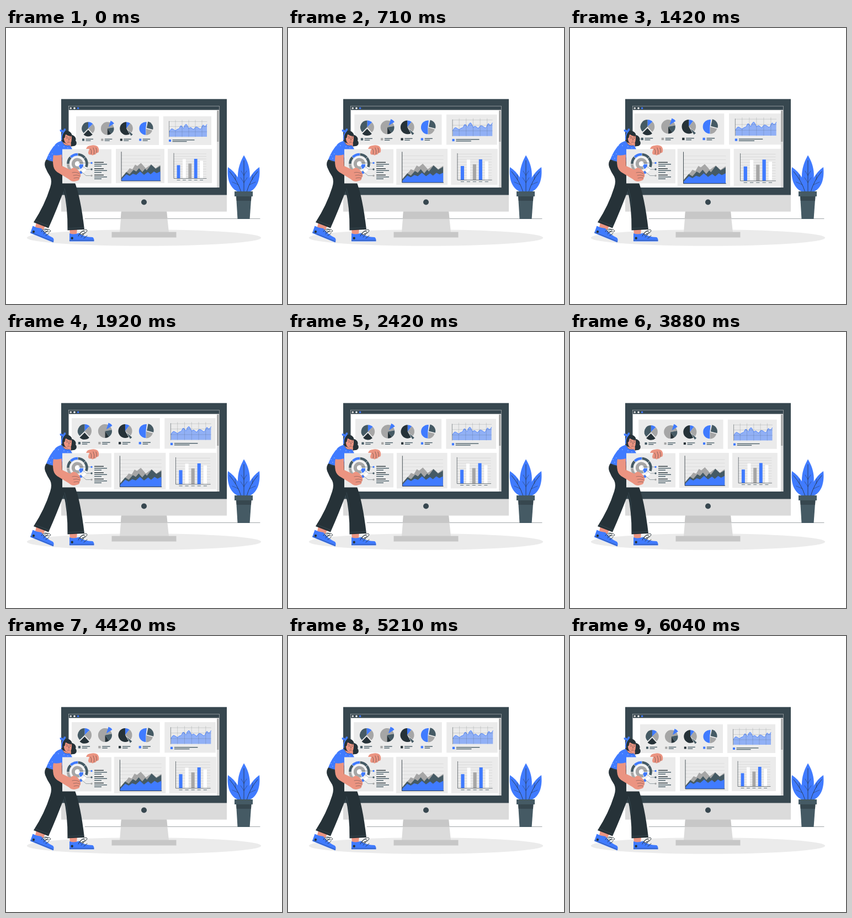
Animation of 500 by 500 pixels, one loop 6080 ms. Source, as an HTML page:

```html
<!DOCTYPE html>
<html lang="en">
<head>
<meta charset="utf-8">
<title>Dashboard</title>
<style>
html, body { margin: 0; width: 100%; height: 100%; overflow: hidden; background: #fff; }
svg { display: block; width: 100vw; height: 100vh; }
</style>
</head>
<body>
<svg id="stage" viewBox="0 0 500 500"></svg>
<script>
const BLUE = '#407bff', INK = '#263238', SLATE = '#455a64', FRAME = '#37474f',
      GRAY = '#a6a6a6', PANEL = '#ebebeb', SKIN = '#eb9481', WHITE = '#fff';

const path = (d, fill, extra = '') => `<path d="${d}" fill="${fill}" ${extra}/>`;
const stroke = (d, color, width = 0.6, extra = '') =>
  path(d, 'none', `stroke="${color}" stroke-width="${width}" stroke-linecap="round" stroke-linejoin="round" ${extra}`);
const rect = (x, y, w, h, fill, extra = '') =>
  `<rect x="${x}" y="${y}" width="${w}" height="${h}" fill="${fill}" ${extra}/>`;
const circle = (x, y, r, fill) => `<circle cx="${x}" cy="${y}" r="${r}" fill="${fill}"/>`;
const range = (n, make) => Array.from({ length: n }, (_, i) => make(i)).join('');

function polar(x, y, r, degrees) {
  const a = degrees * Math.PI / 180;
  return [x + r * Math.sin(a), y - r * Math.cos(a)].map(v => v.toFixed(2));
}

// Clockwise wedge; angles start at twelve o'clock, shift pulls it outward.
function wedge(x, y, r, from, to, fill, shift = 0) {
  const [cx, cy] = polar(x, y, shift, (from + to) / 2).map(Number);
  const big = to - from > 180 ? 1 : 0;
  return path(`M${cx} ${cy}L${polar(cx, cy, r, from)}A${r} ${r} 0 ${big} 1 ${polar(cx, cy, r, to)}Z`, fill);
}

function ringArc(x, y, r, from, to, color, width) {
  const big = to - from > 180 ? 1 : 0;
  return path(`M${polar(x, y, r, from)}A${r} ${r} 0 ${big} 1 ${polar(x, y, r, to)}`, 'none',
    `stroke="${color}" stroke-width="${width}"`);
}

function legend(x, y, color, long, short) {
  return rect(x, y, 4, 4, color) + rect(x + 6.5, y + 0.2, long, 1.3, SLATE) +
    rect(x + 6.5, y + 2.9, short, 1.3, SLATE);
}

function pies() {
  const pie = (x, slices) => slices.map(s => wedge(x, 182, 11.8, ...s)).join('');
  return rect(127, 160, 150, 52, PANEL) +
    pie(149, [[0, 45, BLUE], [45, 138, GRAY], [138, 225, INK, 2.6], [225, 360, SLATE]]) +
    pie(183.7, [[180, 440, GRAY], [80, 145, SLATE], [145, 180, INK], [18, 58, BLUE, 3.6]]) +
    pie(218, [[0, 38, BLUE], [38, 130, GRAY], [130, 150, SLATE, 4], [150, 360, INK]]) +
    pie(253.2, [[12, 105, SLATE, 1.8], [105, 180, GRAY, 0.6], [180, 367, BLUE]]) +
    [[138, SLATE], [172.3, GRAY], [206.8, INK], [241.2, BLUE]]
      .map(([x, c]) => legend(x, 200.5, c, 13.5, 9)).join('');
}

function areaChart() {
  const line = 'M296 188Q299 181 302 183T307 186Q310 183 312 183T316 177.5Q318 176 320 180' +
    'T323 178Q326 172 328 176T331 182Q334 179 336 181T340 184Q343 178 346 179.5' +
    'T350 182Q353 185 355 179T359 178Q362 179 364 174.5';
  return rect(285, 160, 87, 52, PANEL) +
    path(line + 'V197H296Z', BLUE, 'opacity=".52"') +
    stroke(line, BLUE, 0.8) +
    stroke(range(5, i => `M${307 + i * 12} 167V197`) + 'M296 169.5H364M296 178.5H364M296 188H364', INK, 0.3, 'opacity=".5"') +
    stroke('M295.5 169V197', INK, 0.45) +
    legend(295, 202, BLUE, 40, 26);
}

function mountains() {
  return rect(199, 219, 88, 62, PANEL) +
    stroke(range(6, i => `M209 ${231 + i * 6.2}H279.5`), GRAY, 0.35, 'opacity=".6"') +
    path('M209 271L216 263 221 258 224 254 229 256 234 247.5 238 250 244.5 244.5 253 254 263 247 271 254 279.5 248V277H209Z', GRAY) +
    path('M209 272L218 261 224 265 231 257 236 260 241 254 247 261 252 255 255 258 263 247.5 271 255 279.5 250V277H209Z', SLATE) +
    path('M209 274L218 265 224 268 230 264 236 266 243 260 250 266 257 261 262 265 268 260 273 263 279.5 260V277H209Z', BLUE) +
    stroke('M209 224.5V277H280', INK, 0.8);
}

function barChart() {
  const bars = [[24, BLUE], [35, WHITE], [27, GRAY], [35.5, BLUE], [32, WHITE]];
  return rect(293, 219, 80, 62, PANEL) +
    stroke(range(10, i => `M304 ${228 + i * 4.6}H362.5`), GRAY, 0.35, 'opacity=".7"') +
    bars.map(([h, c], i) => rect(309.6 + i * 10.4, 272.5 - h, 5.8, h, c) +
      rect(309.6 + i * 10.4, 275, 5.8, 0.8, SLATE)).join('') +
    stroke('M304 227V272.5H363', INK, 0.6);
}

function monitor() {
  return `<ellipse cx="250" cy="380" rx="212" ry="14.8" fill="${PANEL}"/>` +
    stroke('M143 345.4H460', INK, 0.45) +
    path('M209 332H291L295 370H206Z', '#dbdbdb') + path('M209 332H291L292.6 346H207.6Z', '#c7c7c7') +
    rect(191.5, 369.5, 117, 10, '#c7c7c7') +
    rect(100, 302, 300, 30.6, '#dbdbdb') + rect(100, 128.7, 300, 173.8, FRAME) +
    circle(250, 315.5, 5, FRAME) +
    rect(113.5, 148.5, 273, 140.5, WHITE) +
    rect(113.6, 141.6, 272.8, 7, FRAME, 'stroke="#dbdbdb" stroke-width=".5"') +
    circle(117.3, 145.2, 1.7, '#dbdbdb') + circle(124, 145.2, 1.7, WHITE) + circle(130.6, 145.2, 1.7, BLUE) +
    `<g clip-path="url(#screen)"><g id="board">${pies()}${areaChart()}${mountains()}${barChart()}</g></g>` +
    rect(382, 149, 4, 140, '#dbdbdb') + rect(382.2, 150, 3.2, 56, GRAY);
}

function plant() {
  return path('M428 297C415 277 419 251 431 230.5C444 251 446 277 433 297Z', BLUE) +
    path('M424 298C404 292 400 271 402 252C417 262 427 278 429 298Z', BLUE) +
    path('M433 298C435 278 445 262 459 252C461 271 457 292 438 298Z', BLUE) +
    stroke('M431 240V297M405 260Q419 276 426 297M456 260Q442 276 436 297', INK, 0.8) +
    stroke('M431 267L426 259M431 267L436 259M431 280L425 271M431 280L437 271' +
      'M416 275L415 266M421 284L410 279M446 275L447 266M441 284L452 279', INK, 0.5) +
    path('M417 304H444.5L441.5 346H419.5Z', SLATE) + path('M417 304H444.5L444 313H417.7Z', FRAME) +
    rect(414, 296, 33, 9, SLATE);
}

function shoes() {
  return path('M55 352L72 358 67 366 53 361Z', SKIN) + path('M115 363H129L128 374H116Z', SKIN) +
    path('M48.5 358.5Q55 362 64 363Q72 374 85 380Q88 383 85.5 388.5L44 371.5Z', BLUE) +
    path('M115 372Q122 375 132 371.5Q142 379 157 379Q160 381 159.5 386.5H115Z', BLUE) +
    stroke('M44.5 370L86 387M115 384.8H159', INK, 0.5) +
    circle(50, 369, 2.2, INK) + circle(119.7, 380.7, 2.2, INK) +
    stroke('M64 369Q68 363 73 364Q80 367 72 369Q64 371 70 366Q79 363 81 368Q79 371 72 368M68 373L74 369M72 376L78 372', INK, 0.9) +
    stroke('M131 377Q134 369 140 368Q147 370 139 374Q131 377 136 370Q146 362 147 367Q146 372 138 373M136 379L141 374M141 381L147 376', INK, 0.9);
}

function legs() {
  return path('M75 236Q68 243 71 252Q75 262 80 269Q84 277 80 289Q70 321 50 352L77 362.5Q92 329 106 291L116 275 102 240Z', INK) +
    path('M92 272L124 278Q135 305 142 365L111.5 366.5Q112 324 104 292Z', INK) +
    stroke('M53 349L78 359M112 363L141 361.5M106 291Q111 307 111 322M77 241Q88 244 101 243', SLATE, 0.5);
}

function head() {
  return path('M116 193C125 194 128 200 126 204C130 208 127 215 121 214C113 217 108 208 112 203Z', INK) +
    path('M103 202L118 209 117 218 102 214Z', SKIN) +
    path('M103 207C99 200 99 191 104 187.5C111 183.5 119 188 119.5 195L112 211 106 208Z', INK) +
    path('M106.5 194Q110 191 114 193.5L118.8 194.5Q119.5 200 118.5 205Q117.5 211 112.5 211Q106 209 105 202Q104 199 106.5 199Z', SKIN) +
    path('M105 188Q112 184 119 192L118.5 196Q112 196 108 192Q107 196 106.5 198L104 198Z', INK) +
    stroke('M101 202Q100 193 105 187.5', BLUE, 2) +
    path('M104 189Q97 189 97.5 184.5Q101 183 104 186Q104 181 108 182.5Q109 186.5 104 189Z', BLUE) +
    stroke('M109 196.8L111.5 197.5M115.5 197.5L118 196.5M113.5 199L114.5 203 113 203M111.5 207Q113 205.7 115 207', INK, 0.5) +
    circle(110.6, 199.6, 0.7, INK) + circle(116.6, 199.6, 0.7, INK);
}

function shirt() {
  const spots = [[95, 213], [90, 220], [99, 222], [84, 228], [92, 228], [81, 236], [105, 215], [112, 217], [88, 213], [78, 231]];
  return path('M101 204.5Q94 206 90 210Q79 222 73 238Q86 244 104 242L120 232 120 220Q118 214 115 212.5Q107 214 104 209Z', BLUE) +
    spots.map(([x, y]) => circle(x, y, 0.6, WHITE)).join('') +
    stroke('M85 230L88 223M103 207Q106 215 115 213', INK, 0.4);
}

function card() {
  const x = 129.4, y = 246;
  const outer = [[-45, 2, BLUE], [4, 50, SLATE], [52, 110, SLATE], [112, 150, WHITE], [152, 220, BLUE], [222, 268, GRAY], [270, 313, SLATE]];
  return rect(102, 219.5, 89, 62, PANEL) +
    outer.map(([a, b, c]) => ringArc(x, y, 17, a, b, c, 4.6)).join('') +
    circle(x, y, 13, '#f5f5f5') + ringArc(x, y, 7.5, 155, 450, GRAY, 6) +
    wedge(x, y, 10, 92, 153, BLUE, 1) + circle(x, y, 4.5, WHITE) +
    stroke('M132 244.5H155M138 250L146 256H155M135 259L145 267.5H155', SLATE, 0.5) +
    [[244.5, BLUE], [256, SLATE], [267.5, GRAY]].map(([cy, c]) => circle(155, cy, 1.7, c)).join('') +
    [242.7, 254.2, 265.7].map(r => rect(160, r, 17, 1.4, INK) + rect(160, r + 3.4, 23, 1.4, SLATE) +
      rect(160, r + 6.8, 13, 1.4, SLATE)).join('');
}

function arms() {
  return path('M86 229Q84 241 86 251Q88 259 96 263L114 274Q120 280 128 277Q134 276 133 272Q137 268 134 262Q130 255 123 253Q118 254 117 257L102 250 101 228Z', SKIN) +
    path('M84 230L88 218 102 218 102 229Q93 232 84 230Z', BLUE) +
    stroke('M120 262Q127 260 133 264M122 267Q128 265 134 268M123 272Q128 270 133 272M101.5 235V250', INK, 0.4) +
    path('M145 219Q147 213 153 213Q160 211 165 214Q169 217 168 224Q167 227 164 226Q163 230 159.5 229Q157 232 154 229Q149 231 149 225L151 219Z', SKIN) +
    stroke('M153 219Q156 223 154 229M158 217Q161 223 159.5 229M163 217Q165 221 164 226', INK, 0.5);
}

document.getElementById('stage').innerHTML =
  `<defs><clipPath id="screen">${rect(113.8, 149, 268.2, 140, WHITE)}</clipPath></defs>` +
  monitor() + plant() + shoes() + legs() + head() + shirt() + card() + arms();

// Breathing zoom of the dashboard: time, amount.
const LOOP = 6080;
const KEYS = [[0, 0], [630, 0.56], [1260, 1], [1880, 0.76], [2440, 0.46], [3250, 0.1],
  [3750, 0.17], [4410, 0.73], [4815, 1], [5210, 0.73], [5640, 0.29], [6080, 0]];
const board = document.getElementById('board');

function keyAt(i) {
  const n = KEYS.length - 1, turn = Math.floor(i / n), [t, v] = KEYS[i - turn * n];
  return [t + turn * LOOP, v];
}

// Smooth cubic through the keys, flat at every extreme.
function slope(i) {
  const [t0, v0] = keyAt(i - 1), [t1, v1] = keyAt(i), [t2, v2] = keyAt(i + 1);
  return (v1 - v0) * (v2 - v1) <= 0 ? 0 : (v2 - v0) / (t2 - t0);
}

function zoomAt(time) {
  let i = 0;
  while (KEYS[i + 1][0] <= time) i++;
  const [t0, v0] = keyAt(i), [t1, v1] = keyAt(i + 1);
  const d = t1 - t0, u = (time - t0) / d, w = 1 - u;
  return w * w * (1 + 2 * u) * v0 + u * u * (3 - 2 * u) * v1 +
    d * u * w * (w * slope(i) - u * slope(i + 1));
}

const start = performance.now();
function draw(now) {
  const scale = 1 + 0.087 * zoomAt(Math.max(0, now - start) % LOOP);
  board.setAttribute('transform', `translate(250 221) scale(${scale.toFixed(5)}) translate(-250 -221)`);
  requestAnimationFrame(draw);
}
draw(start);
</script>
</body>
</html>
```
